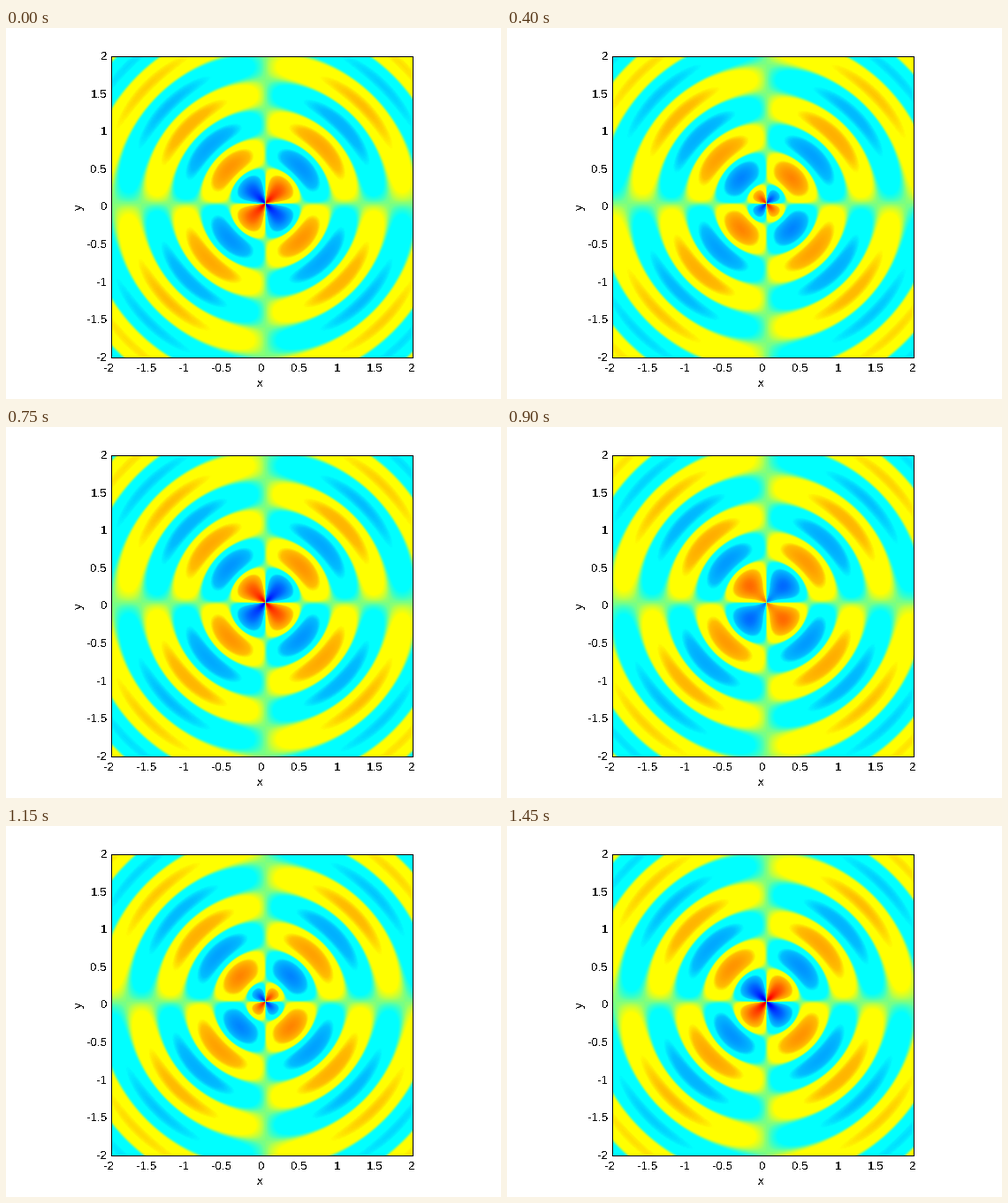
Recreate the animation shown at these times as a matplotlib script. Size 560x420 px, loop 1500 ms.

```python
import numpy as np
import matplotlib
import matplotlib.pyplot as plt
from matplotlib.animation import FuncAnimation
from matplotlib.colors import LinearSegmentedColormap
from matplotlib.patches import Rectangle

W, H, DPI = 560, 420, 100
LEFT, TOP, SIDE = 118, 31, 341      # plot box in pixels
UNIT = SIDE / 4                     # pixels per axis unit
CENTER = (293, 198.2)               # wave centre in pixels
FRAMES, INTERVAL = 30, 50
K = 2 * np.pi / 0.75
PHASE = np.radians(58)
CORE = 0.12                         # softening radius at the centre
REF, POWER = 0.18, 0.45             # colour compression

matplotlib.rcParams["font.family"] = "Liberation Sans"
matplotlib.rcParams["text.antialiased"] = False


def bessel2(x):
    """Bessel functions J2 and Y2 from their integral forms."""
    n = 600
    a = (np.arange(n) + 0.5) * np.pi / n
    t = (np.arange(n) + 0.5) * 7 / n
    x = x[:, None]
    swing = x * np.sin(a) - 2 * a
    j = np.cos(swing).mean(axis=1)
    decay = 2 * np.cosh(2 * t) * np.exp(-x * np.sinh(t))
    y = np.sin(swing).mean(axis=1) - decay.sum(axis=1) * 7 / n / np.pi
    return j, y


def make_cmap():
    warm = [(0.5, (125, 255, 125)), (0.53, (140, 255, 115)),
            (0.585, (255, 255, 0)), (0.665, (255, 255, 0)),
            (0.69, (255, 190, 0)), (0.75, (255, 140, 0)),
            (0.875, (255, 0, 0)), (1, (128, 0, 0))]
    cool = [(1 - v, rgb[::-1]) for v, rgb in warm[:0:-1]]
    stops = [(v, tuple(c / 255 for c in rgb)) for v, rgb in cool + warm]
    return LinearSegmentedColormap.from_list("wave", stops, N=512)


# Quadrupole wave: an outgoing cylindrical wave times sin(2 * angle)
px = np.arange(LEFT + 1, LEFT + SIDE + 1)
py = np.arange(TOP + 1, TOP + SIDE + 1)
dx, dy = np.meshgrid((px - CENTER[0]) / UNIT, (CENTER[1] - py) / UNIT)
r = np.maximum(np.hypot(dx, dy), 0.01)
lobes = 2 * dx * dy / (r**2 + CORE**2)
radii = np.linspace(0.01, 3.2, 1500)
j2, y2 = bessel2(K * radii)
in_phase = lobes * np.interp(r, radii, j2)
quadrature = lobes * np.interp(r, radii, y2)


def field(i):
    a = PHASE - 2 * np.pi * i / FRAMES
    u = in_phase * np.cos(a) - quadrature * np.sin(a)
    return 0.5 + REF * np.sign(u) * (np.abs(u) / REF) ** POWER


fig = plt.figure(figsize=(W / DPI, H / DPI), dpi=DPI, facecolor="white")
ax = fig.add_axes([0, 0, 1, 1])
image = ax.imshow(field(0), cmap=make_cmap(), vmin=0, vmax=1,
                  interpolation="nearest", aspect="auto",
                  extent=(LEFT + 1, LEFT + SIDE + 1, TOP + SIDE + 1, TOP + 1))
ax.set_xlim(0, W)
ax.set_ylim(H, 0)
ax.axis("off")
ax.add_patch(Rectangle((LEFT + 0.5, TOP + 0.5), SIDE, SIDE, fill=False,
                       edgecolor="black", linewidth=72 / DPI,
                       antialiased=False))


def label(x, y, text, **kw):
    ax.text(x, y, text, fontsize=9.6, color="black", **kw)


for n in range(9):
    value = n / 2 - 2
    text = f"{value:g}"
    pos = n * SIDE / 8
    shift = -1.5 if value < 0 else 0.5
    label(LEFT + pos + shift, 389, text, ha="center", va="baseline")
    label(114.5, TOP + SIDE - pos + 5, text, ha="right", va="baseline")
label(287.5, 406, "x", ha="center", va="baseline")
label(83, 203, "y", ha="center", va="center", rotation=90)


def update(i):
    image.set_data(field(i))
    return [image]


anim = FuncAnimation(fig, update, frames=FRAMES, interval=INTERVAL,
                     repeat=True, repeat_delay=0, blit=False)
plt.show()
```
